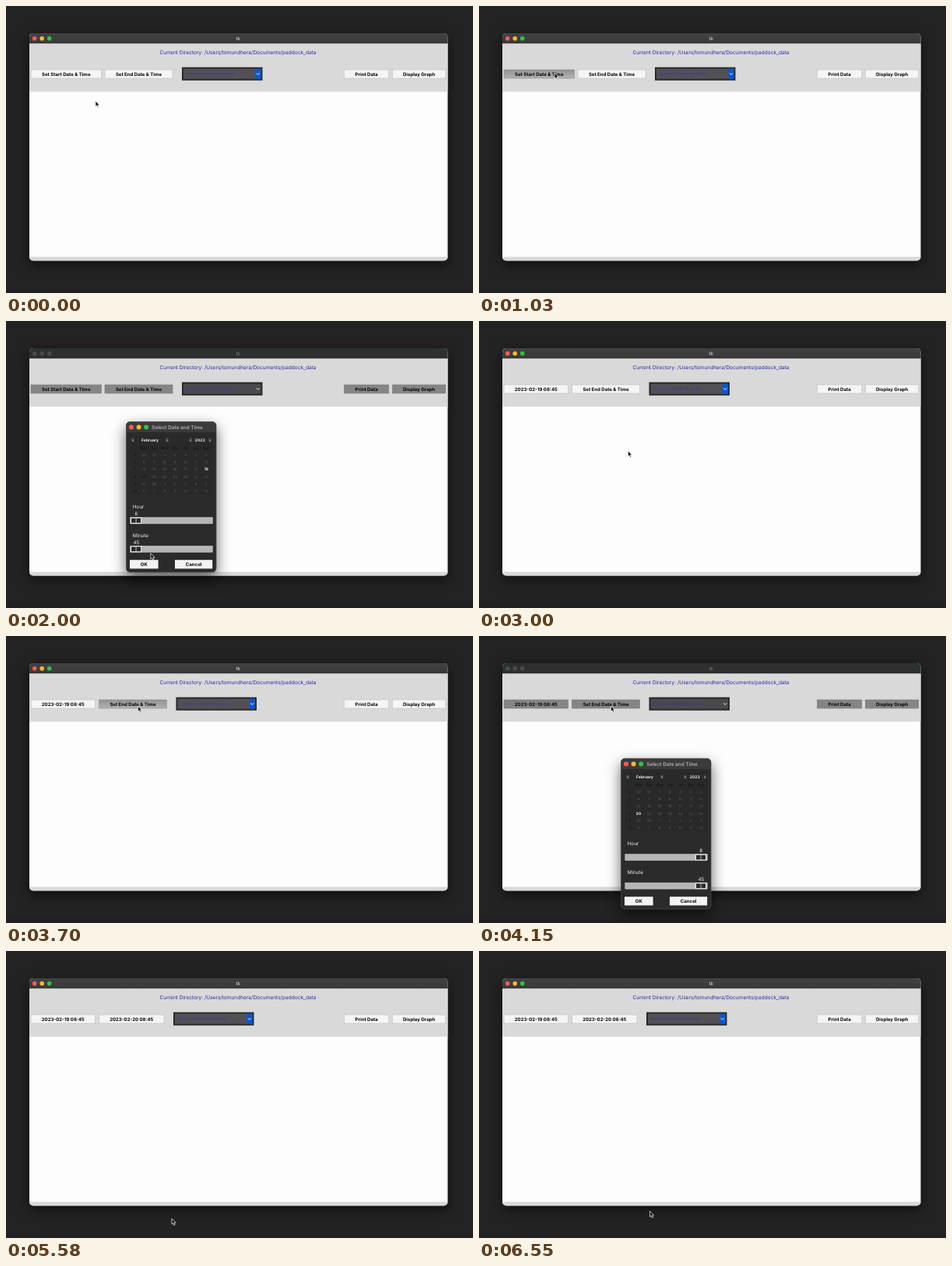
Animation, 600 px wide and 369 px high, one loop 6580 ms. Source, as an HTML page:

```html
<!DOCTYPE html>
<html lang="en">
<head>
<meta charset="utf-8">
<title>Date picker demo</title>
<style>
  html, body { margin: 0; width: 100%; height: 100%; overflow: hidden; background: #232323; }
  svg { display: block; width: 100%; height: 100%; }
  text { font-family: Inter, "Open Sans", sans-serif; text-rendering: geometricPrecision; white-space: pre; }
  .window { filter: drop-shadow(0 5px 8px rgba(0, 0, 0, .55)); }
  .dialog { filter: drop-shadow(0 7px 9px rgba(0, 0, 0, .6)); }
</style>
</head>
<body>
<svg viewBox="0 0 600 369">
  <defs>
    <linearGradient id="bar" x2="0" y2="1">
      <stop stop-color="#424242"/><stop offset="1" stop-color="#383838"/>
    </linearGradient>
    <linearGradient id="down" x2="0" y2="1">
      <stop stop-color="#929292"/><stop offset="1" stop-color="#b2b2b2"/>
    </linearGradient>
    <clipPath id="frame"><rect x="30" y="35" width="537.5" height="292.5" rx="5"/></clipPath>
  </defs>
  <rect width="600" height="369" fill="#232323"/>
  <rect y="364" width="600" height="5" fill="#211f21"/>
  <g id="scene"></g>
  <path id="cursor" d="M0 0V7.3L1.7 5.8L2.9 8.6L4.1 8.1L2.9 5.4H5.2Z"
        fill="#0a0a0a" stroke="#fff" stroke-width=".7" stroke-linejoin="round"/>
</svg>
<script>
const LOOP = 6580;
const scene = document.getElementById('scene');
const cursor = document.getElementById('cursor');

// time, start chosen, end chosen, pressed button, open dialog
const phases = [
  [0, 0, 0, '', 0],
  [970, 0, 0, 'start', 0],
  [1120, 0, 0, '', 0],
  [1230, 0, 0, '', 1],
  [2240, 0, 0, 'ok', 1],
  [2360, 1, 0, '', 0],
  [3620, 1, 0, 'end', 0],
  [3740, 1, 0, '', 0],
  [3840, 1, 0, '', 2],
  [5290, 1, 0, 'ok', 2],
  [5420, 1, 1, '', 0]
];

// time, x, y of the pointer tip
const path = [
  [0, 115, 122], [360, 115, 122], [870, 97, 86], [1400, 97, 86],
  [2100, 191, 311], [2430, 191, 311], [3000, 191.5, 167],
  [3450, 169.5, 90], [4360, 169.5, 90], [5000, 213, 344],
  [5700, 213, 344], [6200, 219.5, 334.5], [LOOP, 219.5, 334.5]
];

const rect = (x, y, w, h, fill, extra = '') =>
  `<rect x="${x}" y="${y}" width="${w}" height="${h}" fill="${fill}" ${extra}/>`;

const text = (s, x, y, size, fill, weight = 400, anchor = 'middle') =>
  `<text x="${x}" y="${y}" font-size="${size}" fill="${fill}" font-weight="${weight}" text-anchor="${anchor}">${s}</text>`;

const lights = (x, y, gap, r, active) =>
  ['#fc5b52', '#fdb92c', '#30c544'].map((c, i) =>
    `<circle cx="${x + i * gap}" cy="${y}" r="${r}" fill="${active ? c : '#4b4d4d'}"/>`).join('');

function button(label, x, w, active, pressed) {
  const fill = pressed ? 'url(#down)' : active ? '#f5f5f5' : '#858585';
  const edge = pressed ? '#8d8d8d' : active ? '#bdbdbd' : '#7c7c7c';
  return rect(x, 82, w, 11, fill, `stroke="${edge}" stroke-width=".6"`) +
    text(label, x + w / 2, 89.7, 6.05, '#050505', 700);
}

function combo(x, active) {
  return rect(x, 78.7, 103.5, 17, '#29292b') +
    rect(x + 2, 80.7, 99.5, 13, active ? '#535156' : '#4a494d') +
    text('Select a Paddock Name', x + 5, 89.2, 5.6, '#3d3b91', 400, 'start') +
    (active ? rect(x + 94, 80.7, 7.7, 13, '#0b57d0', 'rx="1"') : '') +
    `<path d="M${x + 95.8} 86.3l2 2l2-2" fill="none" stroke="#f4f4f4" stroke-width="1"/>`;
}

function mainWindow(hasStart, hasEnd, pressed, active) {
  const startW = hasStart ? 82.5 : 90.5;
  const endX = hasStart ? 119.5 : 127;
  const comboX = hasEnd ? 215 : hasStart ? 218.5 : 226;
  return '<g class="window"><g clip-path="url(#frame)">' +
    rect(30, 35, 538, 293, '#fdfdfd') +
    rect(30, 35, 538, 13.5, active ? 'url(#bar)' : '#2c302f') +
    rect(30, 48.5, 538, 61.7, '#d9d9d9') +
    rect(30, 322.5, 538, 5, '#d9d9d9') +
    lights(36.7, 41.7, 9.5, 2.8, active) +
    text('tk', 298.3, 43.9, 6.2, active ? '#b9b9b9' : '#696d6c', 600) +
    text('Current Directory: /Users/tomundhera/Documents/paddock_data', 298, 61.8, 6.55, '#2929a9') +
    button(hasStart ? '2023-02-19 08:45' : 'Set Start Date &amp; Time', 32, startW, active, pressed === 'start') +
    button(hasEnd ? '2023-02-20 08:45' : 'Set End Date &amp; Time', endX, hasEnd ? 83.5 : 87, active, pressed === 'end') +
    combo(comboX, active) +
    button('Print Data', 434.5, 57.3, active) +
    button('Display Graph', 496.5, 68.3, active) +
    '</g></g>';
}

function calendar(selected) {
  const colX = c => 23 + c * 13.4;
  let out = rect(6, 18, 105, 75.5, '#292929');
  [[9, '‹'], [53, '›'], [83, '‹'], [108, '›']].forEach(([x, s]) => {
    out += rect(x - 2, 20.8, 4, 6, '#3b3b3b') + text(s, x, 25.6, 5, '#eee', 700);
  });
  out += text('February', 31, 25.9, 5, '#f2f2f2', 700) + text('2023', 95.3, 25.9, 5, '#f2f2f2', 700);
  'Mon Tue Wed Thu Fri Sat Sun'.split(' ').forEach((d, c) => {
    out += text(d, colX(c), 35.7, 4.5, '#111', 500);
  });
  for (let row = 0; row < 6; row++) {
    const y = 45 + row * 9.2;
    out += text(row + 5, 12, y, 4.4, '#141414', 500);
    for (let c = 0; c < 7; c++) {
      const n = row * 7 + c - 1;
      const day = n < 1 ? n + 31 : n > 28 ? n - 28 : n;
      const on = n === selected;
      const fill = on ? '#fff' : n === 20 ? '#101010' : n < 1 || n > 28 ? '#5a5a5a' : c > 4 ? '#555' : '#646464';
      out += text(day, colX(c), y, on ? 4.8 : 4.4, fill, on ? 700 : 400);
    }
  }
  return out;
}

function slider(label, value, y, right) {
  const x = right ? 96 : 6;
  return text(label, 8.7, y, 6.3, '#f2f2f2', 400, 'start') +
    text(value, x + 7.3, y + 8.5, 6.3, '#f2f2f2') +
    rect(5.8, y + 11.2, 105.6, 8, '#b5b5b5', 'stroke="#d6d6d6" stroke-width=".5"') +
    rect(x, y + 11.2, 14, 8, '#f4f4f4') +
    rect(x + 1, y + 12.3, 5.7, 5.9, '#2a2a2a') +
    rect(x + 7.4, y + 12.3, 5.7, 5.9, '#2a2a2a');
}

function dialog(kind, pressed) {
  const second = kind === 2;
  const shift = second ? 28 : 0;
  const key = (label, x, w, down) =>
    rect(x, 178.2, w, 11.2, down ? '#a8a8a8' : '#f3f3f3') + text(label, x + w / 2, 186, 6.1, '#050505', 700);
  return `<g class="dialog" transform="translate(${154 + shift} ${129 + shift})">` +
    rect(.3, .5, 115.8, 193.6, '#2b2b2b', 'rx="5" stroke="#5a5a5a" stroke-width=".6"') +
    '<path d="M.6 14V5.5Q.6 .8 5.3 .8H111Q115.8 .8 115.8 5.5V14Z" fill="#3b3b3b"/>' +
    lights(7, 7.5, 9.6, 3, true) +
    text('Select Date and Time', 66, 9.8, 6.4, '#b4b4b4', 600) +
    calendar(second ? 20 : 19) +
    slider('Hour', 8, 112.3, second) +
    slider('Minute', 45, 149, second) +
    key('OK', 5, 36.6, pressed === 'ok') +
    key('Cancel', 63, 48.2) + '</g>';
}

function pointerAt(t) {
  const i = path.findIndex(p => p[0] > t);
  const [t0, x0, y0] = path[i - 1], [t1, x1, y1] = path[i];
  const u = (t - t0) / (t1 - t0), k = u * u * (3 - 2 * u);
  return [x0 + (x1 - x0) * k, y0 + (y1 - y0) * k];
}

let shown;
function draw(now) {
  const t = now % LOOP;
  const phase = phases.findLast(p => p[0] <= t);
  if (phase !== shown) {
    shown = phase;
    const [, hasStart, hasEnd, pressed, open] = phase;
    scene.innerHTML = mainWindow(hasStart, hasEnd, pressed, !open) + (open ? dialog(open, pressed) : '');
  }
  cursor.setAttribute('transform', `translate(${pointerAt(t)})`);
}

const begin = performance.now();
function tick() {
  draw(performance.now() - begin);
  requestAnimationFrame(tick);
}
tick();
</script>
</body>
</html>
```
